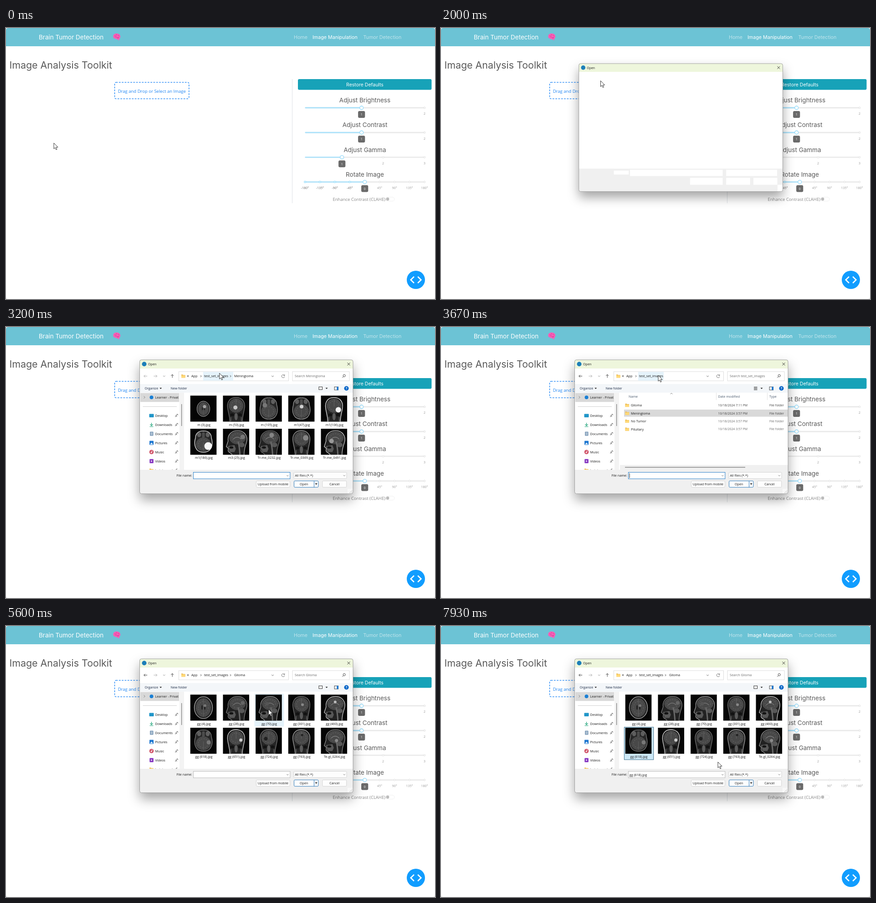
Animation of 942 by 594 pixels, one loop 8 s. Source, as an HTML page:

```html
<!DOCTYPE html>
<html lang="en">
<head>
<meta charset="utf-8">
<title>Image Analysis Toolkit</title>
<style>
  html, body { margin: 0; width: 100%; height: 100%; overflow: hidden; background: #ececec; }
  svg { display: block; width: 100vw; height: 100vh; }
  text { font-family: "Open Sans", "Noto Sans", sans-serif; white-space: pre; }
  .wide { font-family: Inter, "Open Sans", sans-serif; }
  .scan { filter: blur(.45px); }
</style>
</head>
<body>
<svg id="stage" viewBox="0 0 942 594" xmlns="http://www.w3.org/2000/svg"></svg>
<script>
const LOOP = 8000, FPS = 15;

// ---- markup helpers ----
const rect = (x, y, w, h, fill, more = '') =>
  `<rect x="${x}" y="${y}" width="${w}" height="${h}" fill="${fill}" ${more}/>`;
const circle = (x, y, r, fill, more = '') =>
  `<circle cx="${x}" cy="${y}" r="${r}" fill="${fill}" ${more}/>`;
const oval = (x, y, rx, ry, fill, more = '') =>
  `<ellipse cx="${x}" cy="${y}" rx="${rx}" ry="${ry}" fill="${fill}" ${more}/>`;
const line = (d, color, w = 1, more = '') =>
  `<path d="${d}" fill="none" stroke="${color}" stroke-width="${w}" ${more}/>`;
const shape = (d, fill, more = '') => `<path d="${d}" fill="${fill}" ${more}/>`;
// y is the middle of the capitals
const text = (x, y, s, size = 7.2, fill = '#1b1b1b', more = '') =>
  `<text x="${x}" y="${y + size * .36}" font-size="${size}" fill="${fill}" ${more}>${s}</text>`;
const mid = 'text-anchor="middle"';
const wide = (x, y, s, size, fill, more = '') => text(x, y, s, size, fill, 'class="wide" ' + more);
const group = (id, body) => `<g id="${id}">${body}</g>`;
const folder = (x, y) =>
  shape(`M${x} ${y - 3.5}h3l1 1h4.6v6h-8.6z`, '#e8b64c') + rect(x, y - 1.7, 8.6, 5.3, '#ffd978', 'rx=".5"');

// ---- web page ----
function slider(y, title, handle, value, marks) {
  let out = wide(788, y - 16.6, title, 13.5, '#5a5a5a', mid)
    + rect(656.5, y - 1.3, 262.5, 2.6, '#e9e9e9', 'rx="1.3"')
    + rect(656.5, y - 1.3, handle - 656.5, 2.6, '#abe2fb', 'rx="1.3"');
  for (const [x, label] of marks) {
    const on = x < handle;
    out += circle(x, y, 1.8, '#fff', `stroke="${on ? '#8fdafa' : '#e4e4e4'}" stroke-width="1.2"`)
      + text(x, y + 13, label, 7, on ? '#666' : '#999', mid);
  }
  return out + circle(handle, y, 3.9, '#fff', 'stroke="#96dbfa" stroke-width="1.4"')
    + rect(handle - 7.6, y + 7, 15.2, 15, '#6a6a6a', 'rx="3"')
    + text(handle, y + 14.7, value, 7, '#fff', mid);
}

function page() {
  const angles = [];
  for (let a = -180; a <= 180; a += 45)
    if (a) angles.push([787.7 + a / 180 * 131.2, a + '°']);
  const brain = shape('M235.4 19.5C234.6 15.5 238 12 242.5 12C247.5 11.6 251.4 14.8 251.2 19C251 22 249.6 23.2 248.8 23.4L248.6 26.6L246.4 27L245.3 24.4C242 25.6 240 24 239 22.8C237 23 235.8 21.6 235.4 19.5Z', '#f95fb8')
    + line('M238 17q2 2 4-.5M241.5 14q2.5 .2 2.5 2.5M246 15q3 1 2 3.5M240 20.5q2-2 4 0t4-.5M244 23q1.5-2 4-1', '#c93a8c', .8);
  return rect(0, 0, 942, 594, '#fff', 'rx="5"')
    + shape('M0 40V5Q0 0 5 0H937Q942 0 942 5V40Z', '#6cc3d5')
    + wide(72, 19.8, 'Brain Tumor Detection', 13.5, '#fff') + brain
    + wide(632, 19.7, 'Home', 10.7, '#bfe4ec')
    + wide(673, 19.7, 'Image Manipulation', 10.7, '#fff')
    + wide(784.5, 19.7, 'Tumor Detection', 10.7, '#bfe4ec')
    + wide(7.5, 81.5, 'Image Analysis Toolkit', 21.4, '#5a5a5a')
    + rect(238.6, 119.1, 163.2, 36, 'none', 'rx="3" stroke="#1480f5" stroke-width="1.3" stroke-dasharray="3.8 2.5"')
    + text(320.3, 138.7, 'Drag and Drop or Select an Image', 9.5, '#1f85f3', mid)
    + line('M628.5 112V384', '#dee2e6')
    + rect(641, 112, 293.5, 23.5, '#17a2b8', 'rx="3"')
    + wide(788, 123.8, 'Restore Defaults', 10.5, '#fff', mid)
    + slider(174.9, 'Adjust Brightness', 780.7, 1, [[919, 2]])
    + slider(229.1, 'Adjust Contrast', 780.7, 1, [[919, 2]])
    + slider(283.3, 'Adjust Gamma', 737.7, 1, [[828, 2], [919, 3]])
    + slider(337.5, 'Rotate Image', 787.7, 0, angles)
    + text(717.5, 376, 'Enhance Contrast (CLAHE)', 9.5, '#888')
    + rect(834, 370.8, 19, 8.6, '#fff', 'rx="4.3" stroke="#ededed" stroke-width=".8"')
    + circle(838, 375, 3.4, '#bcbcbc')
    + circle(900, 552, 20, '#119dff')
    + line('M896 545L888.8 552L896 559M904.2 545L911.4 552L904.2 559', '#fff', 2.6);
}

// ---- scan thumbnails ----
const folds = (x, y, rx, ry) => oval(x, y, rx, ry, '#484848', 'stroke="#6e6e6e" stroke-dasharray="1.6 2.2"')
  + oval(x, y, rx * .68, ry * .68, 'none', 'stroke="#5c5c5c" stroke-width="1.4" stroke-dasharray="3 2.4"');
const heads = {
  axial: tone => oval(28.5, 28.5, 20, 24, '#262626', `stroke="${tone}" stroke-width="1.4"`)
    + folds(28.5, 28.5, 16, 20) + line('M28.5 9V48', '#6a6a6a', .7)
    + oval(25.5, 28, 1.6, 5, '#222') + oval(31.5, 28, 1.6, 5, '#222'),
  tiny: tone => `<g transform="translate(8.5 9) scale(.7)">${heads.axial(tone)}</g>`,
  eyes: tone => shape('M28.5 5C38 4 46 10 46 20C49 30 48 40 42 47C35 53 22 53 15 47C9 40 8 30 11 20C11 10 19 4 28.5 5Z', '#262626', `stroke="${tone}" stroke-width="1.4"`)
    + folds(28.5, 34, 16, 14.5) + oval(19, 13, 4.5, 5.5, '#5e5e5e') + oval(38, 13, 4.5, 5.5, '#5e5e5e')
    + rect(25.5, 8, 6, 12, '#4c4c4c', 'rx="2"') + line('M28.5 30V48', '#6a6a6a', .7),
  front: tone => shape('M28 4C42 4 49 14 47 27C46 37 43 41 42 58H15C14 41 11 37 10 27C8 14 15 4 28 4Z', '#252525', `stroke="${tone}" stroke-width="1.3"`)
    + folds(28.5, 22, 15.5, 15) + line('M28.5 8V24', '#707070', .7)
    + oval(20, 42, 4, 3.2, '#121212') + oval(37, 42, 4, 3.2, '#121212')
    + oval(28.5, 46, 3.5, 8, '#5b5b5b') + line('M17 47v9M40 47v9', '#555', 2),
  side: tone => shape('M11 27C9 13 19 4 32 4C46 4 54 15 52 27C51 35 46 39 46 58H20C20 53 11 53 11 48L11.5 43L7 39Z', '#222', `stroke="${tone}" stroke-width="1.2"`)
    + folds(31.5, 20, 17.5, 13.5) + oval(41, 35.5, 6.5, 5, '#575757')
    + line('M33 28Q36 39 37 57', '#686868', 3) + line('M22 23Q31 14 40 23', '#7d7d7d', 1.3)
    + shape('M11 38L25 36L28 44L25 51L14 51Z', '#585858') + oval(18, 41, 4.5, 2.6, '#141414')
};
// name, head, outline, lesion x, y, radius, tone
const menTiles = [
  ['m (3).jpg', 'tiny', '#c4c4c4', 31, 24, 3.5, '#a5a5a5'], ['m (53).jpg', 'front', '#777', 27, 26, 4.5, '#c5c5c5'],
  ['m (105).jpg', 'eyes', '#888', 20, 21, 5, '#777'], ['m1(47).jpg', 'eyes', '#999', 29, 24, 4, '#d0d0d0'],
  ['m1(106).jpg', 'front', '#eee', 38, 31, 6, '#f4f4f4'], ['m1(186).jpg', 'eyes', '#ddd', 39, 38, 8.5, '#f7f7f7'],
  ['m3 (25).jpg', 'side', '#bbb', 43, 18, 5, '#777'], ['Tr-me_0232.jpg', 'side', '#777', 35, 14, 5, '#858585'],
  ['Tr-me_0369.jpg', 'front', '#999', 38, 20, 6, '#858585'], ['Tr-me_0491.jpg', 'side', '#ddd', 23, 27, 5, '#999']];
const gliTiles = [
  ['gg (4).jpg', 'axial', '#aaa', 32, 24, 3, '#777'], ['gg (28).jpg', 'side', '#888', 43, 18, 4, '#666'],
  ['gg (70).jpg', 'side', '#aaa', 25, 20, 4, '#555'], ['gg (301).jpg', 'front', '#777', 31, 22, 3, '#888'],
  ['gg (460).jpg', 'side', '#ddd', 31, 16, 3, '#bbb'], ['gg (618).jpg', 'eyes', '#777', 40, 32, 4.5, '#777'],
  ['gg (651).jpg', 'front', '#ddd', 39, 27, 3.5, '#ccc'], ['gg (724).jpg', 'front', '#777', 22, 24, 4, '#202020'],
  ['gg (763).jpg', 'front', '#aaa', 30, 16, 2.5, '#222'], ['Te-gl_0264.jpg', 'side', '#999', 34, 28, 3.5, '#8a8a8a']];
const STEP = 71.7;
const tiles = list => list.map(([name, head, tone, x, y, r, glow], i) => {
  const left = 405 + i % 5 * STEP, top = i < 5 ? 150.4 : 223;
  return `<g transform="translate(${left} ${top})">${rect(-.3, 0, 57.6, 57, '#050505')}`
    + `<g class="scan" clip-path="url(#tile)">${heads[head](tone)}${circle(x, y, r, glow)}</g></g>`
    + text(left + 29.5, top + 63.7, name, 7.1, '#1b1b1b', mid);
}).join('');

// ---- file dialog ----
const button = (x, w, label, cx, edge = '#d0d0d0') =>
  rect(x, 337.3, w, 14, '#fdfdfd', `rx="2" stroke="${edge}" stroke-width=".9"`) + text(cx, 344.3, label, 7.2, '#1b1b1b', mid);

function sidebar() {
  const places = ['Desktop', 'Downloads', 'Documents', 'Pictures', 'Music', 'Videos'];
  const icons = [
    y => rect(314.5, y - 3.5, 10, 7.5, '#2196c9', 'rx="1"'),
    y => line(`M319.5 ${y - 4}v6.5m-3-3l3 3l3-3M315.5 ${y + 4.5}h8`, '#1fa37a', 1.2),
    y => rect(316, y - 4.5, 7.5, 9, '#7d9bb8', 'rx="1"') + line(`M317.5 ${y - 2}h4.5m-4.5 2h4.5m-4.5 2h4.5`, '#fff', .7),
    y => rect(315, y - 4.5, 9, 9, '#1f78d1', 'rx="1"') + shape(`M316 ${y + 3.5}l3.5-4l3.5 4z`, '#fff'),
    y => circle(319.5, y, 4.8, '#d1576b') + circle(319, y + 1, 1.3, '#fff') + line(`M320.3 ${y + 1}v-3.5l1.5 .5`, '#fff', .8),
    y => rect(315.3, y - 4.5, 8.5, 9, '#8434c0', 'rx="1"') + shape(`M318.3 ${y - 2}l3.2 2l-3.2 2z`, '#fff')];
  let out = rect(295, 144.7, 85.5, 19.6, '#d9d9d9') + line('M302.6 151.5l2.6 2.6l-2.6 2.6', '#777', .9)
    + circle(319.5, 154.3, 4, '#1a7fd4') + text(327.5, 154.3, 'Learner - Privat')
    + line('M300.5 174.5H375', '#d0d0d0');
  places.forEach((name, i) => {
    const y = 194 + i * 20;
    out += icons[i](y) + text(327.5, y, name)
      + line(`M371.5 ${y + 3.2}l2.2-2.2m-1.2-1.6l3 3m-1.7-2.7l2-2m-.4-1.2l2.6 2.6`, '#777', 1.1);
  });
  return out + folder(315, 314) + text(327.5, 314, 'training_set') + line('M373 313l3-2.5', '#777', 1.2);
}

function fileList() {
  const rows = [['Glioma', '7:11'], ['Meningioma', '3:57'], ['No Tumor', '3:57'], ['Pituitary', '3:57']];
  let out = text(412, 152.5, 'Name', 7.2, '#4a5a6e') + text(608.5, 152.5, 'Date modified', 7.2, '#4a5a6e')
    + text(721, 152.5, 'Type', 7.2, '#4a5a6e')
    + line('M604.5 144V160M716.5 144V160', '#e2e2e2') + line('M503.5 147l2.5-2l2.5 2', '#666', .8)
    + rect(402, 181, 360, 15.6, '#d9d9d9', 'id="rowOld"') + rect(402, 164, 360, 14.8, '#e5f3fb', 'id="rowHot"');
  rows.forEach(([name, time], i) => {
    const y = 171.6 + i * 17.45, ink = i < 2 ? '#444' : '#6d6d6d';
    out += folder(404.5, y) + text(417, y, name) + text(608.5, y, `10/18/2024 ${time} PM`, 6.95, ink)
      + text(721, y, 'File folder', 6.95, ink);
  });
  return out + rect(393, 302.5, 369, 10.5, '#f0f0f0') + line('M404 307.5H668', '#858585', 1.4);
}

function dialog() {
  const frame = rect(293.5, 72, 468.5, 293.5, '#fff', 'rx="4" style="filter:drop-shadow(0 13px 13px rgba(0,0,0,.36))"')
    + `<g clip-path="url(#pane)">` + rect(293, 72, 470, 19, '#eef6dc') + rect(293, 313, 470, 53, '#f0f0f0')
    + circle(303.5, 81.3, 5, '#1c7fb8') + text(312, 81.5, 'Open') + line('M749.5 78.2l6 6m0-6l-6 6', '#222', .9);
  const blank = [[374, 317.5, 34, 9], [411, 315.5, 213, 14.5], [632, 315.5, 117, 14.5], [549, 334, 75, 16],
    [632, 334, 55, 16], [694.5, 334, 55, 16], [750, 350, 12, 15.5]].map(b => rect(...b, '#fff')).join('');
  const arrow = (x, dir) => `M${x - 3.7 * dir} 107.7h${7.4 * dir}m${-3 * dir}-3l${3 * dir} 3l${-3 * dir} 3`;
  const base = rect(293, 125, 470, 19, '#f3f6f9')
    + line(arrow(306.5, -1), '#aaa', .9, 'id="back"') + line(arrow(328, 1), '#aaa', .9)
    + line('M345 106.7l2.2 2l2.2-2', '#888', .9) + line('M365.2 111.3v-7.2m-3 3l3-3l3 3', '#333', .9)
    + rect(721.2, 131.2, 8.4, 6.8, '#fff', 'stroke="#333" stroke-width=".9"') + rect(726.3, 131, 3.5, 7.2, '#1676d2')
    + circle(747.5, 134.5, 5, '#0b67c8') + text(747.5, 134.5, '?', 7.5, '#fff', mid + ' font-weight="700"')
    + rect(381, 144, 10, 169, '#f3f3f3') + line('M385.6 169V217', '#858585', 1.4)
    + `<g clip-path="url(#side)">${sidebar()}</g>`
    + text(374.5, 325.7, 'File name:')
    + rect(411.4, 318.5, 212.4, 14.3, '#fff', 'id="field" stroke-width=".9"')
    + text(413.7, 326, 'gg (618).jpg', 7.2, '#1b1b1b', 'id="fileName"') + line('M414 320.5V331', '#111', .9, 'id="caret"')
    + rect(632, 318.5, 116, 13.8, '#fdfdfd', 'rx="1.5" stroke="#d0d0d0" stroke-width=".9"')
    + text(634.5, 325.6, 'All files (*.*)') + line('M616.3 325l2 2l2-2M740.8 324.7l2 2l2-2', '#555', .8)
    + button(549.5, 74, 'Upload from mobile', 586.5) + button(632.5, 53.3, 'Open', 654.2, '#1c6fb5')
    + line('M676.5 337.5V351', '#1c6fb5', .9) + shape('M678.6 342.8h5l-2.5 3z', '#111')
    + button(694.8, 53, 'Cancel', 721.3)
    + rect(750, 354.5, 12, 11, '#f8f8f8') + line('M754 363h7m-4.5-2.5h4.5m-2-2.5h2', '#aaa', 1.2, 'stroke-dasharray="1.2"');
  const half = line('M383 97.8H379.5V118H383M620.5 97.8V118', '#d5d5d5', .9);
  const bar = rect(379.3, 97.8, 241.2, 20.2, '#fff', 'stroke="#d9d9d9" stroke-width=".9"')
    + rect(629, 97.8, 125, 20.2, '#fff', 'stroke="#d9d9d9" stroke-width=".9"')
    + rect(433, 98.3, 56, 19.3, '#e5f3fb', 'id="crumbHot"')
    + folder(385, 107.7) + text(397.3, 107, '«', 9) + text(407, 107.7, 'App')
    + line('M427 105.8l2 2l-2 2', '#333', .9) + text(435, 107.7, 'test_set_images')
    + line('M492 105.8l2 2l-2 2', '#333', .9, 'id="crumbEnd"')
    + text(501, 107.7, '', 7.2, '#1b1b1b', 'id="crumb"')
    + line('M583.2 106.9l2.3 2l2.3-2', '#555', .9)
    + line('M611.3 106A3.3 3.3 0 1 0 611.8 108.6M611.8 104v2.5h-2.5', '#555', .8)
    + text(634, 107.7, '', 7.2, '#6d6d6d', 'id="search"')
    + circle(742.7, 106.7, 2.5, 'none', 'stroke="#333" stroke-width=".9"') + line('M741 108.6l-2.7 2.7', '#333', .9)
    + text(304.5, 134.5, 'Organize', 7.1, '#1b2a44') + shape('M337.2 133.2h5l-2.5 2.8z', '#222')
    + text(361.5, 134.5, 'New folder', 7.1, '#1b2a44')
    + rect(687, 131.2, 7.5, 6, '#fff', 'id="bigView" stroke="#333" stroke-width="1"')
    + line('M687 131.5h7.5m-7.5 2.1h7.5m-7.5 2.1h7.5m-7.5 2.1h7.5', '#333', .9, 'id="listView"')
    + shape('M701.5 133.2h5l-2.5 2.8z', '#222');
  return frame + group('blank', blank)
    + group('body', base + group('half', half) + group('bar', bar)
      + rect(0, 0, 65, 72, '#e5f3fb', 'id="tileHot"') + rect(402.4, 221.7, 64.3, 71.3, '#cce8f7', 'id="tilePick" stroke="#3c6f8c" stroke-width="1"')
      + group('men', tiles(menTiles)) + group('list', fileList()) + group('gli', tiles(gliTiles)))
    + '</g>' + rect(293.5, 72, 468.5, 293.5, 'none', 'rx="4" stroke="#8c8c8c" stroke-width=".8"');
}

const outline = 'stroke="#222" stroke-width=".9" stroke-linejoin="round"';
const pointer = shape('M0 0V12.8L2.9 10.1L4.9 14.8L7 13.9L5 9.3H9Z', '#fff', 'id="arrow" ' + outline)
  + line('M-2.3-6H-.6L0-5.4L.6-6H2.3M0-5.4V6.4M-2.3 7H-.6L0 6.4L.6 7H2.3', '#222', .9, 'id="beam"')
  + shape('M-1.4 1a1.4 1.4 0 0 1 2.8 0V5.5l6 1.3Q8.8 7.2 8.6 9L8 13.5Q7.7 15.5 6.5 15.5H1L-4 9.5Q-4.3 7.6-2.6 8L-1.4 9Z', '#fff', 'id="hand" ' + outline);

const clip = (id, x, y, w, h, more) => `<clipPath id="${id}">${rect(x, y, w, h, '#000', more)}</clipPath>`;
const stage = document.getElementById('stage');
stage.innerHTML = clip('pane', 293.5, 72, 468.5, 293.5, 'rx="4"') + clip('side', 294, 144, 86.5, 169) + clip('tile', 0, 0, 57, 57)
  + page() + group('dialog', dialog()) + group('cursor', pointer);

const ui = {};
stage.querySelectorAll('[id]').forEach(el => ui[el.id] = el);
const show = (id, on) => { ui[id].style.display = on ? '' : 'none'; };
const set = (id, name, value) => ui[id].setAttribute(name, value);

// ---- motion ----
const ease = {
  both: p => p * p * (3 - 2 * p), in: p => p ** 1.5, out: p => 1 - (1 - p) ** 2, even: p => p, jump: p => p < 1 ? 0 : 1
};
// time, x, y, easing towards the point
const route = [
  [0, 105, 252], [200, 105, 252], [1000, 335.5, 142, 'both'], [1133, 339, 137, 'jump'], [1267, 341, 138, 'jump'],
  [1400, 341, 138], [1600, 343, 140, 'even'], [1800, 343, 140], [2000, 350, 116, 'in'], [2267, 415, 70, 'out'],
  [2533, 415, 70], [3400, 477, 106, 'both'], [3667, 477, 106], [4467, 477, 171, 'both'], [5333, 477, 171],
  [5800, 640, 190, 'both'], [6267, 640, 190], [6667, 480, 245, 'in'], [6933, 417, 251, 'out'], [7000, 417, 251],
  [7267, 423, 252, 'both'], [7800, 423, 252], [7933, 608, 298, 'in'], [8000, 608, 298]];

function cursorAt(t) {
  let i = 1;
  while (i < route.length - 1 && t > route[i][0]) i++;
  const [t0, x0, y0] = route[i - 1], [t1, x1, y1, how] = route[i];
  const p = ease[how || 'even'](Math.min(1, (t - t0) / (t1 - t0)));
  return [x0 + (x1 - x0) * p, y0 + (y1 - y0) * p];
}

function tileUnder(x, y) {
  const col = Math.floor((x - 402) / STEP), row = y < 220.5 ? 0 : 1;
  const inside = col >= 0 && col < 5 && x - 402 - col * STEP < 65 && y > 148 && y < 293;
  return inside ? row * 5 + col : -1;
}

function draw(ms) {
  const t = Math.floor((ms + 5) % LOOP * FPS / 1000) * 1000 / FPS + 1;
  const within = (a, b) => t >= a && t < b;
  const [x, y] = cursorAt(t);

  set('cursor', 'transform', `translate(${x} ${y})`);
  show('beam', within(1000, 1133));
  show('hand', within(1133, 1866));
  show('arrow', t < 1000 || t >= 1866);

  const grow = Math.min(1, (t - 1800) / 333), size = .888 + .112 * grow;
  show('dialog', t >= 1866);
  set('dialog', 'transform', grow < 1 ? `translate(526.5 218.2) scale(${size}) translate(-527.7 -218.7)` : '');
  set('dialog', 'opacity', Math.max(0, Math.min(1, grow * 1.67)));

  const ready = t >= 2333, listed = within(3666, 4866), inGli = t >= 4866, picked = t >= 7533;
  show('blank', t < 2200);
  show('body', t >= 2200);
  show('half', !ready);
  show('bar', ready);
  show('men', t < 3666);
  show('list', listed);
  show('gli', t >= 4933);
  show('listView', listed);
  show('bigView', !listed);
  set('back', 'stroke', t >= 3666 ? '#333' : '#aaa');

  ui.crumb.textContent = listed ? '' : inGli ? 'Glioma' : 'Meningioma';
  ui.search.textContent = 'Search ' + (listed ? 'test_set_images' : inGli ? 'Glioma' : 'Meningioma');
  show('crumbEnd', !within(3666, 3733));
  show('crumbHot', x > 433 && x < 499 && y > 98 && y < 118);
  set('crumbHot', 'width', within(3666, 3733) ? 56 : 66);

  show('rowOld', t < 4600);
  show('rowHot', y > 164);
  set('rowHot', 'fill', t >= 4600 ? '#cce8f7' : '#e5f3fb');
  set('rowHot', 'stroke', t >= 4600 ? '#2c4f63' : 'none');

  const hot = t >= 4933 ? tileUnder(x, y) : -1;
  show('tileHot', hot >= 0);
  set('tileHot', 'x', 402 + hot % 5 * STEP);
  set('tileHot', 'y', hot < 5 ? 148.5 : 221.5);
  show('tilePick', picked);

  set('field', 'stroke', inGli ? '#b5b5b5' : '#1976c4');
  show('fileName', picked);
  show('caret', t < 4600 && Math.floor((t - 2200) / 533) % 2 === 0);
}

const start = performance.now();
function tick() {
  draw(performance.now() - start);
  requestAnimationFrame(tick);
}
draw(0);
tick();
</script>
</body>
</html>
```
